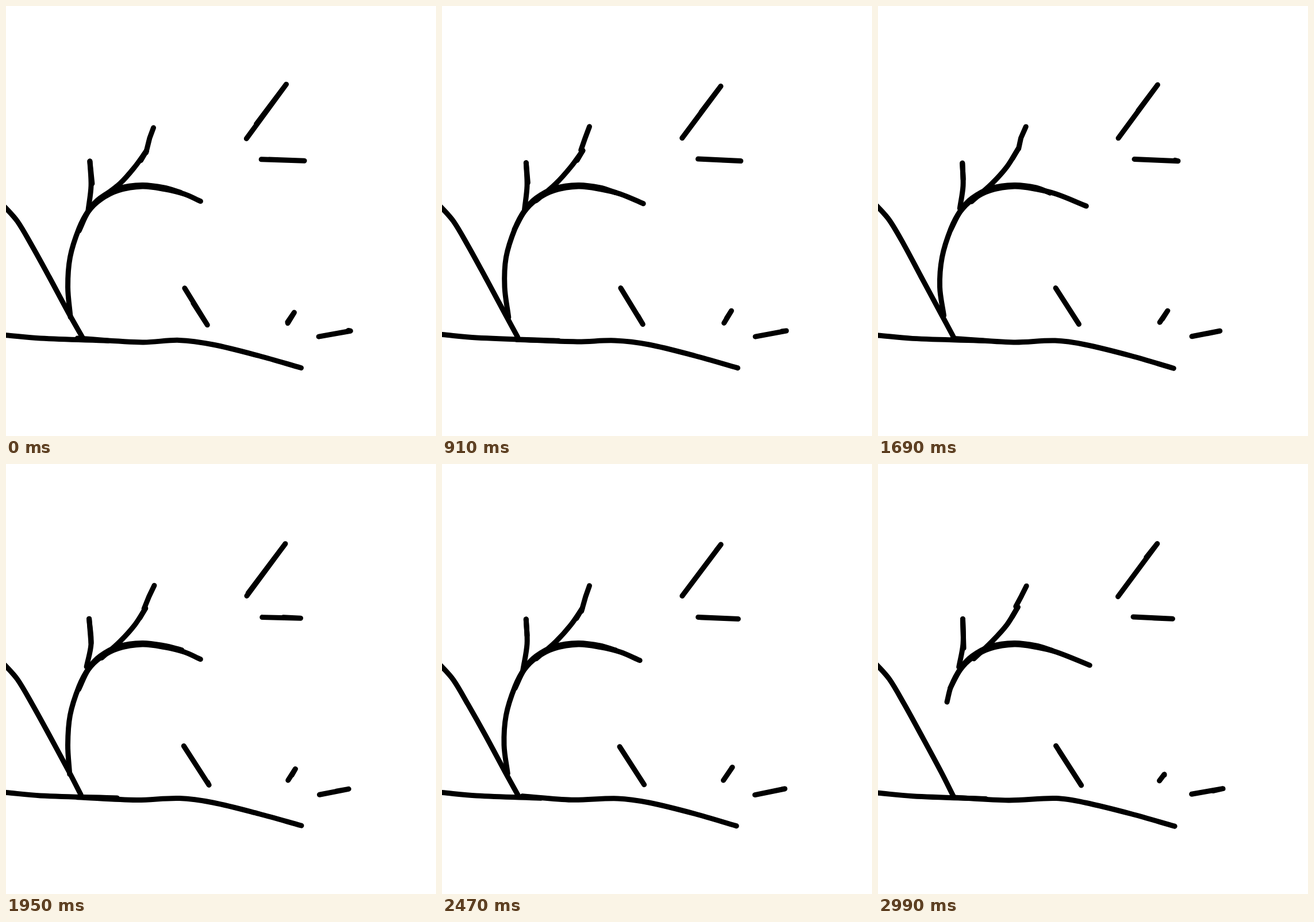
An HTML page with a canvas that plays this animation: 748 by 748 pixels, repeating every 3.12 s.

```html
<!DOCTYPE html>
<html lang="en">
<head>
<meta charset="utf-8">
<title>Boiling line drawing</title>
<style>
  html, body { margin: 0; width: 100%; height: 100%; overflow: hidden; background: #fff; }
  canvas { display: block; }
</style>
</head>
<body>
<canvas id="stage" width="748" height="748"></canvas>
<script>
const ctx = document.getElementById('stage').getContext('2d');
const SIZE = 748, STEP = 130, COUNT = 24;

let seed = 0;

function random() {
  seed = (seed + 0x6D2B79F5) | 0;
  let t = Math.imul(seed ^ (seed >>> 15), 1 | seed);
  t = (t + Math.imul(t ^ (t >>> 7), 61 | t)) ^ t;
  return ((t ^ (t >>> 14)) >>> 0) / 4294967296;
}

const near = (value, spread) => value + (random() * 2 - 1) * spread;
const spot = (x, y, dx = 1, dy = dx) => [near(x, dx), near(y, dy)];

function line(...points) {
  ctx.beginPath();
  points.forEach(([x, y]) => ctx.lineTo(x, y));
  ctx.stroke();
}

// Smooth curve; handles follow the chord of the neighbours, scaled to each span
function curve(...points) {
  const at = i => points[Math.max(0, Math.min(points.length - 1, i))];
  const handle = (i, length) => {
    const [ax, ay] = at(i - 1), [bx, by] = at(i + 1);
    const scale = length / 3 / Math.hypot(bx - ax, by - ay);
    return [at(i)[0] + (bx - ax) * scale, at(i)[1] + (by - ay) * scale];
  };
  ctx.beginPath();
  ctx.moveTo(...points[0]);
  for (let i = 1; i < points.length; i++) {
    const [ax, ay] = at(i - 1), [bx, by] = at(i);
    const length = Math.hypot(bx - ax, by - ay);
    ctx.bezierCurveTo(...handle(i - 1, length), ...handle(i, -length), bx, by);
  }
  ctx.stroke();
}

// Straight mark of varying length, partly gone over again on the way back
function ray(x1, y1, x2, y2, vary) {
  const reach = near(1, vary), back = random();
  const along = t => [x1 + (x2 - x1) * t, y1 + (y2 - y1) * t];
  line(spot(x1, y1), spot(...along(reach), 0.7), spot(...along(reach * back)));
}

function drawHill() {
  const y = near(351, 2);
  curve([-10, y - 9], [0, y], [20, y + 23], [45, y + 65], [75, 471], [110, 536],
    spot(132, 577, 2, 2.5));
}

function drawGround() {
  const y = near(572, 1);
  curve([-10, y - 1], [0, y], [60, y + 5.5], spot(188, 581.5, 20, 2));
  curve(spot(140, 578.5, 18, 2), spot(235, 584.5, 10, 0.7), spot(304, 582, 8, 0.7),
    [360, 589], [440, 608.5], spot(514.5, 629.5, 2.5, 0.8));
}

function drawBranch(footless) {
  const leg = footless
    ? [[120, 414]]
    : [spot(113, 541, 3, 4), [near(108, 1), 489], [111.5, 437]];
  curve(...leg, [127, 387], [144, 355], [164, 334], [195, 317.5], [237, 311.5], [275, 316],
    spot(304, 324.5, 6, 1));

  const endX = near(354, 16);
  curve(spot(126, 390, 2, 4), [143, 358], [164, 337], [195, 321], [237, 314], [275, 318.5],
    [310, 327], [endX, 336 + (endX - 328) * 0.35]);
}

function drawTwigs() {
  const tip = spot(146, 273, 1.5, 4);
  line(tip, spot(149, 308, 1.5, 14));
  curve(tip, [148, 313], spot(142, 356, 2, 4));

  const fork = spot(243, 250, 2);
  curve(spot(164, 339, 4, 3), [198, 309], [224, 280], fork);
  line([fork[0] - 10, fork[1] + 17], fork);
  line(spot(242, 252, 3, 5), spot(249, 230), spot(257, 211, 1.5));
}

function drawRays() {
  ray(418, 230, 486, 138, 0.02);
  ray(445, 266, 517, 269, 0.1);
  ray(310, 491, 351, 556, 0.07);
  ray(490, 551, 501, 534, 0.4);
  ray(545, 575, 597, 565, 0.06);
}

function render() {
  const step = Math.floor(performance.now() / STEP) % COUNT;
  seed = (step + 1) * 7919;
  ctx.fillStyle = '#fff';
  ctx.fillRect(0, 0, SIZE, SIZE);
  ctx.strokeStyle = '#000';
  ctx.lineWidth = 9;
  ctx.lineCap = ctx.lineJoin = 'round';
  drawHill();
  drawGround();
  drawBranch(step === COUNT - 1); // the loop closes on a branch without its foot
  drawTwigs();
  drawRays();
  requestAnimationFrame(render);
}
render();
</script>
</body>
</html>
```
